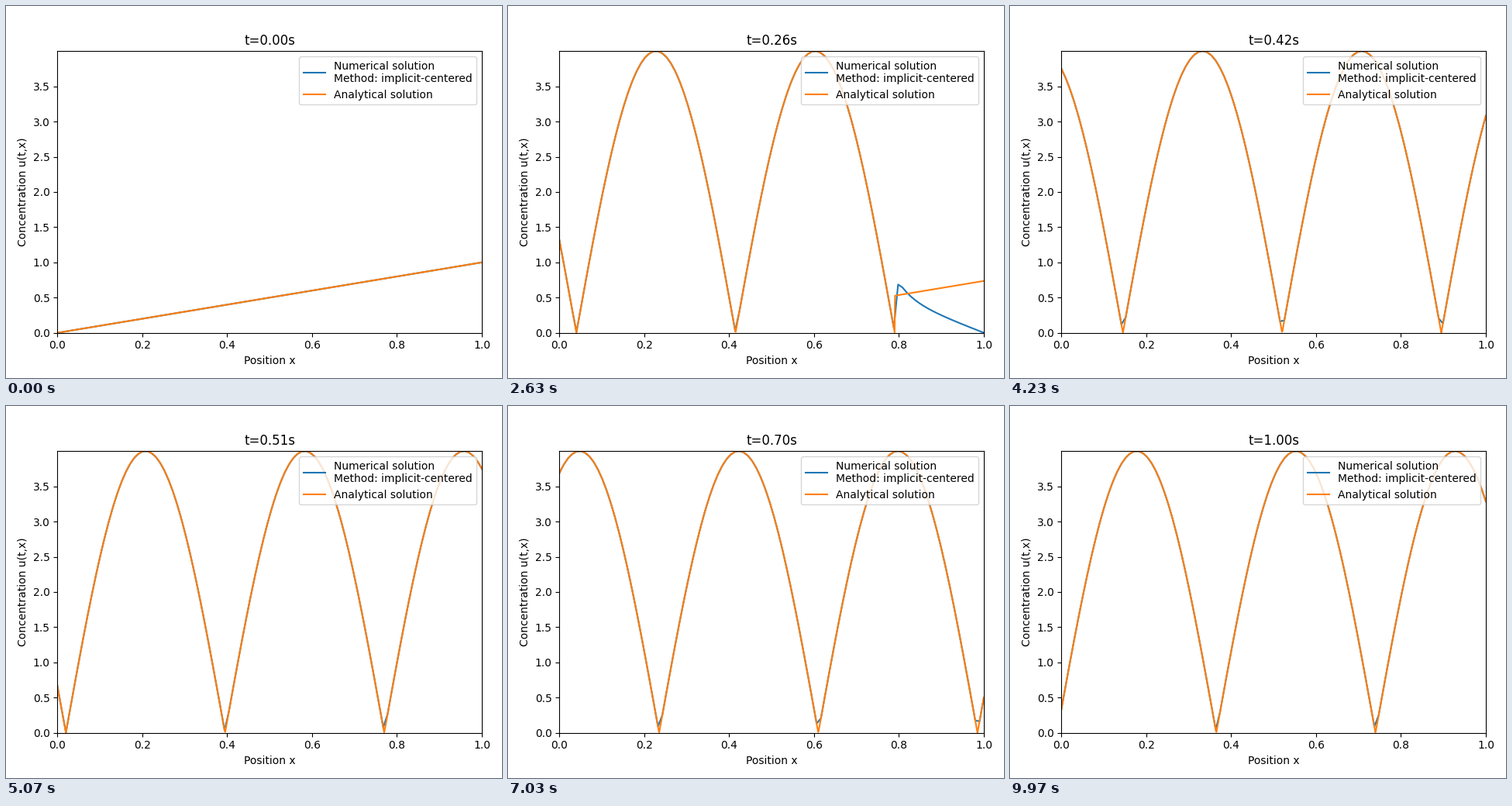
Write a matplotlib script that moves like this. It is 640 by 480 pixels and loops after 10000 ms.

```python
import numpy as np
import matplotlib.pyplot as plt
from matplotlib.animation import FuncAnimation

STEPS = 300
TICKS = 2 * STEPS
LOOP_MS = 10000
SPEED = 3.0

x_num = np.linspace(0, 1, 100)
x_ana = np.linspace(0, 1, 1000)


def inflow(t, x):
    """Rectified sine fed in at x=0 and carried to the right."""
    return 4 * np.abs(np.sin(8 * np.pi * (t - x / SPEED)))


def analytical(t):
    return np.where(x_ana <= SPEED * t, inflow(t, x_ana), x_ana - t)


def numerical(t):
    """Exact behind the front; a tilting line with a leading bump ahead."""
    front = SPEED * t
    gap = x_num - front
    start = 1.86 * t
    end = max(1 - 5.6 * t, 0)
    line = start + (end - start) * gap / max(1 - front, 1e-6)
    bump = 0.188 * np.cbrt(t / 0.177) * np.exp(-np.maximum(gap - 0.015, 0) / 0.037)
    return np.where(gap <= 0, inflow(t, x_num), line + bump)


fig, ax = plt.subplots(figsize=(6.4, 4.8), dpi=100)
num_line, = ax.plot(x_num, numerical(0),
                    label="Numerical solution\nMethod: implicit-centered")
ana_line, = ax.plot(x_ana, analytical(0), label="Analytical solution")
ax.set_xlim(0, 1)
ax.set_ylim(0, 3.99999)
ax.set_yticks(np.arange(0, 4, 0.5))
ax.set_xlabel("Position x")
ax.set_ylabel("Concentration u(t,x)")
title = ax.set_title("t=0.00s")
ax.legend(loc="upper right")
fig.tight_layout()
fig.subplots_adjust(top=0.87875)


def update(tick):
    # Two ticks per time step, rounded to the nearest step.
    step = min((tick + 1) // 2, STEPS - 1)
    t = step / STEPS
    num_line.set_ydata(numerical(t))
    ana_line.set_ydata(analytical(t))
    title.set_text(f"t={t:.2f}s")
    return num_line, ana_line, title


anim = FuncAnimation(fig, update, frames=TICKS, interval=LOOP_MS / TICKS,
                     repeat=True, repeat_delay=0)
plt.show()
```
